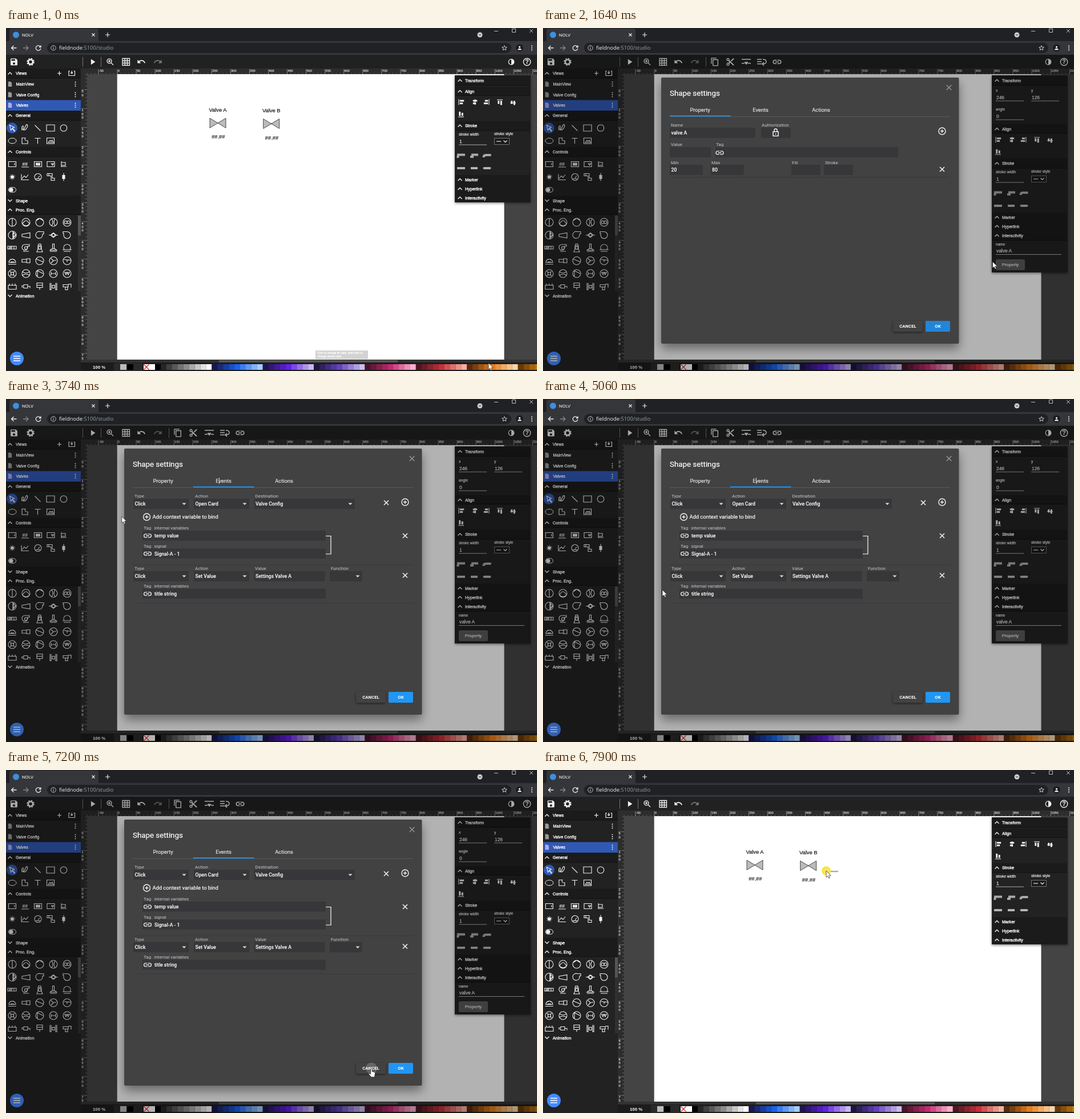
Write an HTML page that moves like this. It is 930x602 px and loops after 8000 ms.

```html
<!DOCTYPE html>
<html lang="en">
<head>
<meta charset="utf-8">
<title>Editor</title>
<style>
html,body{margin:0;width:100%;height:100%;overflow:hidden;background:#444}
svg{display:block;width:100vw;height:100vh;font-family:"Liberation Sans",Arial,sans-serif}
text{white-space:pre}
.dlg{font-family:Roboto,sans-serif}
</style>
</head>
<body>
<svg id="stage" viewBox="0 0 930 602"></svg>
<script>
const WHITE = '#f2f2f2', FIELD = '#37373a';
const rect = (x, y, w, h, fill, more = '') => `<rect x="${x}" y="${y}" width="${w}" height="${h}" fill="${fill}" ${more}/>`;
const text = (x, y, s, size = 7.3, fill = WHITE, more = '', bold = .2) =>
  `<text x="${x}" y="${y}" font-size="${size}" fill="${fill}" stroke="${fill}" stroke-width="${bold}" ${more}>${s}</text>`;
const line = (d, color = WHITE, w = 1, fill = 'none', more = '') => `<path d="${d}" stroke="${color}" stroke-width="${w}" fill="${fill}" ${more}/>`;
const disc = (x, y, r, fill, more = '') => `<circle cx="${x}" cy="${y}" r="${r}" fill="${fill}" ${more}/>`;
const ring = (x, y, r, w = 1, color = WHITE, more = '') => disc(x, y, r, 'none', `stroke="${color}" stroke-width="${w}" ${more}`);
const at = (x, y, s, scale = 1) => `<g transform="translate(${x} ${y}) scale(${scale})">${s}</g>`;
const group = (id, s, more = '') => `<g id="${id}" ${more}>${s}</g>`;
const icon = (x, y, d, size = 16, fill = WHITE) =>
  at(x - size / 2, y - size / 2, `<path d="${d}" fill="${fill}" fill-rule="evenodd"/>`, size / 24);
const cross = (x, y, r = 4, w = 1.6, color = WHITE) => line(`M${x - r} ${y - r}l${2 * r} ${2 * r}m0 ${-2 * r}l${-2 * r} ${2 * r}`, color, w);
const chevron = (x, y, up = true) => line(up ? `M${x - 3.5} ${y + 2}l3.5-3.5l3.5 3.5` : `M${x - 3.5} ${y - 2}l3.5 3.5l3.5-3.5`, WHITE, 1.3);
const repeat = (n, f) => Array.from({length: n}, (_, i) => f(i)).join('');
const MIDDLE = 'text-anchor="middle"';

const ICON = {
  save: 'M17 3H5a2 2 0 0 0-2 2v14a2 2 0 0 0 2 2h14a2 2 0 0 0 2-2V7zM12 19a3 3 0 1 1 0-6a3 3 0 0 1 0 6zM15 9H5V5h10z',
  play: 'M7 4v16l12-8z',
  undo: 'M12.5 8C9.9 8 7.5 9 5.6 10.6L2 7v9h9l-3.6-3.6C8.8 11.2 10.5 10.5 12.5 10.5c3.5 0 6.5 2.3 7.6 5.5l2.4-.8C21 11 17.1 8 12.5 8z',
  copy: 'M16 1H4a2 2 0 0 0-2 2v14h2V3h12zM19 5H8a2 2 0 0 0-2 2v14a2 2 0 0 0 2 2h11a2 2 0 0 0 2-2V7a2 2 0 0 0-2-2zM19 21H8V7h11z',
  cut: 'M9.6 7.6A4 4 0 1 0 7.6 9.6L10 12l-2.4 2.4A4 4 0 1 0 9.6 16.4L12 14l7 7h3v-1zM6 8a2 2 0 1 1 0-4a2 2 0 0 1 0 4zM6 20a2 2 0 1 1 0-4a2 2 0 0 1 0 4zM19 3l-6 6l2 2l7-7V3z',
  link: 'M3.9 12a3.1 3.1 0 0 1 3.1-3.1h4V7H7a5 5 0 0 0 0 10h4v-1.9H7A3.1 3.1 0 0 1 3.9 12zM8 13h8v-2H8zM17 7h-4v1.9h4a3.1 3.1 0 0 1 0 6.2h-4V17h4a5 5 0 0 0 0-10z',
  person: 'M12 12a4.5 4.5 0 1 0 0-9a4.5 4.5 0 0 0 0 9zM3 21c0-9 18-9 18 0z',
  file: 'M5 2h9l5 5v15H5z'
};

function browser() {
  const arrow = 'M5 0h-9m4-4l-4 4l4 4';
  return rect(0, 0, 930, 24, '#202124') + rect(0, 23, 930, 24, '#35363a')
    + line('M3 24q3 0 3-4V5q0-4 4-4h148q4 0 4 4v15q0 4 3 4z', 'none', 0, '#35363a')
    + disc(17.5, 12, 5.5, '#3d8fe0') + text(28, 15, 'NOLV', 7.6, '#e0e0e0')
    + cross(153, 12, 2.5, 1.1) + line('M174 12h8m-4-4v8', WHITE, 1.1)
    + disc(830, 12, 4.5, '#ccc') + line('M828 11l2 2l2-2', '#222')
    + line('M855 5.5h7', '#bbb') + line('M886.5 1.5h6v6h-6z', '#bbb') + cross(920, 5, 3, 1, '#bbb')
    + at(13.5, 35, line(arrow, WHITE, 1.3)) + at(35, 35, line(arrow, '#85868a', 1.3, 'none', 'transform="scale(-1 1)"'))
    + line('M60 32.5a4.3 4.3 0 1 0 .8 3.5M61 30.5v3h-3', WHITE, 1.3)
    + rect(72, 26, 813, 18, '#202124', 'rx="9"') + ring(83, 35, 4.3, .9, '#ccc') + line('M83 34v3.5M83 32v1', '#ccc')
    + `<text x="93" y="38.3" font-size="9.3" font-family="Open Sans,sans-serif" fill="#f0f0f0">fieldnode<tspan fill="#9aa0a6">:5100/studio</tspan></text>`
    + line('M873 30.8l1.2 2.9l3.1.2l-2.4 2l.8 3l-2.7-1.7l-2.7 1.7l.8-3l-2.4-2l3.1-.2z', '#ddd', .9)
    + disc(899.5, 35, 6.5, '#1b1c1f') + icon(899.5, 35, ICON.person, 9) + repeat(3, i => disc(921, 31.5 + 3.5 * i, 1.1, WHITE));
}

function toolbar() {
  const sep = x => line(`M${x} 51v17`, '#777', 1);
  return rect(0, 47, 930, 24, '#212121') + icon(14, 59.5, ICON.save)
    + ring(43, 59.5, 4, 2.6) + ring(43, 59.5, 5.8, 1.8, WHITE, 'stroke-dasharray="2.6 1.955"')
    + sep(134.5) + icon(152, 59.5, ICON.play, 15) + sep(166.5)
    + ring(181, 58, 3.9, 1.4) + line('M184 61l4 4M179 58h4m-2-2v4', WHITE, 1.4)
    + line('M204 53.5h12.5v12H204zm4.2 0v12m4.2-12v12M204 57.5h12.5M204 61.5h12.5', WHITE, 1.3)
    + icon(237, 59, ICON.undo) + at(266, 59, `<g transform="scale(-1 1)">${icon(0, 0, ICON.undo, 16, '#777')}</g>`)
    + group('selTools', sep(285.5) + icon(301, 59.5, ICON.copy) + icon(328, 59.5, ICON.cut)
      + at(356, 59, line('M-8-4h16M-8 3h5m6 0h5', WHITE, 1.6) + line('M-3 1l3 4l3-4z', WHITE, 1, WHITE))
      + at(383, 59, line('M-8-4h8M-8 0h8M-8 4h8M2-4q6 0 6 4q0 4-6 4M4 1l-3 3l3 3', WHITE, 1.5)) + icon(410, 59.5, ICON.link, 18))
    + ring(885, 59.5, 4.8, 1.2) + line('M885 54.5a5 5 0 0 1 0 10z', WHITE, 0, WHITE)
    + ring(912.5, 59.5, 6.2, 1.4) + text(912.5, 63, '?', 10, WHITE, MIDDLE + ' font-weight="bold"');
}

function rulers() {
  const step = 33.06;
  return rect(131, 71, 799, 531, '#444') + rect(131, 71, 799, 10, '#2d2d2d') + rect(131, 71, 11, 516, '#2d2d2d')
    + repeat(119, i => line(`M${142.1 + i * step / 5} 79v2`, '#888', .6))
    + repeat(24, i => line(`M${161.9 + i * step} 72v9`, '#aaa', .7) + text(162.8 + i * step, 77, (i - 1) * 50, 5.6, '#ddd'))
    + repeat(76, i => line(`M139 ${82 + i * step / 5}h3`, '#888', .6))
    + repeat(15, i => [...String((i + 1) * 50)].map((c, k) => text(132.5, 113.2 + i * step + k * 6.3, c, 5.6, '#ddd')).join('')
      + line(`M132 ${108.3 + i * step}h10`, '#888', .6))
    + rect(194.7, 81, 677.8, 501, '#fff');
}

function leftPanel() {
  const head = (y, name, open = true) => rect(0, y - 8.5, 131, 17, '#1b1b1b') + line(`M0 ${y + 8.5}h131`, '#111') + chevron(7, y, open)
    + text(17, y + 2.5, name, 7.3, '#fff', '', .35);
  const view = (y, name, on) => (on ? rect(0, y - 9, 131, 18.5, '#3059b5') : '') + icon(7, y, ICON.file, 11, on ? '#b9a6e8' : '#999')
    + text(17.5, y + 2.7, name, 7.3, '#fff', '', .3) + repeat(3, i => disc(121.5, y - 3.6 + 3.6 * i, 1, WHITE));
  const glyph = (x, y, d, fill) => at(x, y, line(d, WHITE, 1.1, fill));
  const C = 'M-7 0a7 7 0 1 0 14 0a7 7 0 1 0-14 0';
  const dot = 'M-2.5 0a2.5 2.5 0 1 0 5 0a2.5 2.5 0 1 0-5 0';
  const shapes = [
    C + 'M0-7v14', C + 'M-6 3q6-12 12 0M-5 4q5 4 10 0', C + 'M-6-3L0-7L6-3', C + 'M-3-6q4 6 0 12M3-6q-4 6 0 12', C + 'M-5 0a2.5 2.5 0 1 0 5 0a2.5 2.5 0 1 0-5 0m5 0a2.5 2.5 0 1 0 5 0a2.5 2.5 0 1 0-5 0',
    C + 'M1-6v12l5-6zM2-4v8l3-4', 'M-7-1.5L7-4v9L-7 2.5z', 'M7-6H1a6 6 0 1 0 4 6V-2h2z', 'M-8 0h3l5-4l5 4h3M-5 0l5 4l5-4' + dot, 'M-7-6h7a6 6 0 1 1-6 6V-3h-1z',
    'M-8-3H7v5H-8zM-6 2l2-5m0 5l2-5m0 5l2-5M3-3v5', 'M6-6H-2a5 5 0 1 0 5 5V-3h3zM-5 6H5' + dot, 'M-2-7h4v3h-4zM-3-4h6v6h-6zM-5 7l2-5h6l2 5z' + dot, 'M-1.5-7h3v8h-3zM-6 4q6-6 12 0zM-6 6H6', 'M-5 3a6 6 0 1 1 10 0zM-8 3h16M-6 6H6',
    'M-6 3a6 6 0 1 1 12 0zM-7 6H7M-4-2h3m2 0h3M-3 2h6', 'M-7-2.5h8v5h-8zM1-3.500h6v7h-6z', C + 'M-6-3L6 2', C + 'M-4-4L0 0l5-1M0 0l-4 4', C + 'M-5-2L6-1M0-1v3',
    C + dot + 'M-4-4l2 2m4 4l2 2m0-8l-2 2m-4 4l-2 2', C + 'M-6-3q6 4 12 0M-6 3q6-4 12 0', C + 'M-4-6v12M-4-5L6 0', C + 'M-4-3v6m8-6v6M-4 0h8', C + 'M-4-2l2 4l2-4l2 4l2-4M-5-2H5',
    'M-7-2H7v7H-7zM-5-2v-3m5 3v-3m5 3v-3', 'M-8-1h4v-2h7v6h-7v-2h-4M3 0h4v3', 'M-5-6H5V2H-5zM-5-2H5M0 2v4', 'M-6-6v12h2V-6M6-6v12h-2V-6M-2-2h4v5h-4z', 'M-7-3h9v4h-9zM2-4h5v6M-3 1v5h4v-5'
  ];
  return rect(0, 71, 131, 531, '#222') + head(79.5, 'Views') + line('M90 79.5h7m-3.5-3.5v7', WHITE, 1.2)
    + line('M112 75.5h-2v8h10.5v-8h-2M115.2 75v5m-2-2l2 2l2-2', WHITE, 1.2)
    + view(98.5, 'MainView') + view(117, 'Valve Config') + view(135.5, 'Valves', true) + head(153.5, 'General')
    + disc(10.5, 175.5, 9.5, '#3059b5')
    + glyph(10.5, 175.5, 'M-4-5L4-1L1 0l4 5l-1 1l-4-5l-2 3z') + glyph(33, 175.5, 'M-5 4c-2-9 4-10 2-4s2 3 4-3s5-2 3 2s-5 6-8 3')
    + glyph(55.5, 175.5, 'M-5-5L5 5') + glyph(78, 175.5, 'M-7-5.5H7v11H-7z') + ring(101, 175.5, 5.8, 1.1)
    + `<ellipse cx="11" cy="198" rx="7" ry="4.8" fill="none" stroke="${WHITE}"/>` + glyph(33, 198, 'M-5-5h6q-3 5 4 5v5h-10z')
    + glyph(55.5, 198, 'M-5-4.5H5M0-4.5V5') + glyph(78, 198, 'M-6.5-5h13v10h-13zM-4 3l3-4l2 2l2-2l2 4z')
    + head(217, 'Controls') + glyph(11, 239, 'M-6.5-4.5h13v9h-13zM4-2v4') + text(28.5, 241.5, '##', 8.5) + line('M27 244h13')
    + glyph(56, 239, 'M-6.5-4.5h13v9h-13z') + rect(52, 236.5, 8, 5, '#ddd') + glyph(78.5, 239, 'M-6.5-4.5h13v9h-13zM1-1h4l-2 3z')
    + glyph(101, 239, 'M-4-5v10M-4-3h7v5h-7M-4 4h9') + disc(11, 261.5, 3, WHITE) + ring(11, 261.5, 4.3, 1.3, WHITE, 'stroke-dasharray="1 2.378"')
    + glyph(33, 261.5, 'M-6-5V5H7M-5 3l4-5l3 3l4-5') + glyph(56, 261.5, 'M-6 0a6 6 0 1 0 12 0a6 6 0 1 0-12 0M0 2l3-4M-4 3h8')
    + glyph(78, 261.5, 'M-6-6h9v8h4v4H1V-2h-7zM-3-6v4') + glyph(101, 261.5, 'M0-7v14M-2-3h4v6h-4z', WHITE)
    + rect(4.5, 279.8, 13, 8.4, 'none', `rx="4.2" stroke="${WHITE}"`) + disc(9, 284, 3.6, WHITE)
    + head(303, 'Shape', false) + head(319, 'Proc. Eng.')
    + shapes.map((d, i) => glyph(11 + i % 5 * 24, 341 + (i / 5 | 0) * 22.5, d)).join('')
    + rect(126, 329, 5, 133, '#303030') + rect(126, 329, 5, 35, '#555') + rect(0, 462, 131, 140, '#222')
    + chevron(7, 470, false) + text(17, 472.5, 'Animation', 7.3, '#fff', '', .35)
    + disc(19, 580, 12, '#448aff') + line('M13 576h12m-12 4h12m-12 4h12', '#fff', 1.4);
}

// Each palette family runs from dark through a pure tone to a pale tint.
function palette() {
  const families = [['#262626', '#8c8c8c', '#ffffff'], ['#191650', '#1862ef', '#a5cdfb'], ['#201452', '#6420e8', '#c8b8f2'], ['#1c163f', '#6442bd', '#cbbcf0'],
    ['#4b1328', '#c22a72', '#f9aeca'], ['#4e1520', '#c83039', '#f5b09f'], ['#5a2a0e', '#e57f1a', '#fad6aa'], ['#6a3808', '#e09010', '#f8dc90']];
  const channel = (c, k) => parseInt(c.slice(1 + 2 * k, 3 + 2 * k), 16);
  const shade = (f, u) => {
    const i = u < .5 ? 0 : 1, v = u * 2 - i;
    return `rgb(${[0, 1, 2].map(k => Math.round(channel(f[i], k) * (1 - v) + channel(f[i + 1], k) * v))})`;
  };
  const w = 9.93;
  return rect(131, 587, 799, 15, '#1c1c1c') + rect(131, 582, 799, 5, '#333') + rect(373, 583, 313, 4, '#555') + text(152, 598, '100 %', 7.8, '#fff', 'font-weight="bold"', 0)
    + rect(189, 588, 50, 14, '#2a2a2a') + rect(200, 590, 11, 10, '#bbb') + rect(212, 590, 11, 10, '#000')
    + rect(241, 590, 20, 10, '#fff') + cross(246, 595, 4.5, 1.2, '#d22') + rect(261, 590, 10, 10, '#000')
    + families.map((f, n) => repeat(9, i => rect((271 + (n * 9 + i) * w).toFixed(1), 590, 10, 10, shade(f, i / 8)))).join('');
}

function valve(cx, y, name) {
  return text(cx, y - 11.5, name, 9.3, '#111', MIDDLE) + line(`M${cx - 14} ${y}l28 17v-17l-28 17z`, '#222', .8, '#bbb')
    + text(cx + .8, y + 36, '##.##', 9.3, '#111', MIDDLE);
}

function selection() {
  return line('M371 148v9', '#2ecc40', 1) + line('M357 158h28v17h-28z', '#7fa7ea', .8) + disc(371, 145, 3, '#22c837')
    + repeat(9, i => i === 4 ? '' : rect(355 + i % 3 * 14, 156 + (i / 3 | 0) * 8.5, 4, 4, '#e4edff', 'stroke="#6a98ee" stroke-width=".8"'));
}

function sidePanel() {
  const head = (y, s) => rect(787, y - 8, 131, 16, '#1b1b1b') + chevron(795, y) + text(804, y + 2.5, s, 7.3, '#fff', '', .35);
  const rule = y => line(`M787 ${y}h131`, '#0f0f0f');
  const input = (x, y, label, value, w = 49) => text(x, y, label, 6.6, '#eee') + text(x + 1, y + 12.8, value, 8.4) + line(`M${x} ${y + 16}h${w}`, '#bbb', .9);
  const bars = 'M-2-3.5h7v2.5h-7zM-2 1h5v2.5h-5z';
  const align = (x, y, axis, turn) => at(x, y, `<g transform="rotate(${turn})">${line(axis, WHITE, 1.1) + line(bars, WHITE, .4, WHITE)}</g>`);
  const grey = (x, y, d, more) => at(x, y, line(d, '#aaa', 4, 'none', more));
  return rect(786, 83, 133, 223, '#212121', 'id="panelBg" filter="url(#shadow)"') + head(92, 'Transform') + rule(100.5)
    + group('fields', input(793, 112, 'x', 246) + input(855, 112, 'y', 126) + input(793, 145, 'angle', 0))
    + group('lower', head(111, 'Align') + rule(118.5)
      + align(797, 130, 'M-4-5v10', 0) + align(820, 130, 'M1.5-5v10', 0) + align(842, 130, 'M-4-5v10', 180) + align(865, 130, 'M-4-5v10', 90)
      + align(888, 130, 'M1.5-5v10', 90) + align(797, 152, 'M-4-5v10', -90)
      + head(171.5, 'Stroke') + rule(180) + input(793, 189, 'stroke width', 1) + text(855, 188, 'stroke style', 6.6, '#eee')
      + rect(855.5, 193.5, 26, 11, '#1b1b1b', 'stroke="#888" stroke-width=".8"') + line('M859 199h8', WHITE, 1.1) + line('M871.5 197.5l3 3l3-3', WHITE, 1.2)
      + grey(797, 224, 'M-7-1.5H7M-5.5 0v4') + grey(820, 224, 'M-7 2h4v-3.5H7') + grey(842.5, 224, 'M-6 3q0-4 4-4H7')
      + grey(797, 246, 'M-7 0H7') + grey(820, 246, 'M-6 0H6') + grey(842.5, 246, 'M-5 0H5', 'stroke-linecap="round"')
      + line('M791 246h12m11 0h12m11 0h11', '#ddd', .6)
      + head(266, 'Marker') + head(282, 'Hyperlink') + head(298, 'Interactivity'))
    + group('naming', rule(372.5) + input(793, 381.5, 'name', 'valve A', 115) + rect(793, 406, 51, 19, '#5a5a5a', 'id="propBtn" rx="2"')
      + text(818.5, 418.3, 'Property', 7.8, WHITE, MIDDLE));
}

function dialog() {
  const label = (x, y, s) => text(x, y, s, 8, '#c8c8c8', '', 0);
  const value = (x, y, s) => text(x, y, s, 8.6, '#fff', 'font-weight="500"', .1);
  const box = (x, y, w, s = '') => rect(x, y, w, 18, FIELD) + value(x + 2.5, y + 11.6, s);
  const drop = (x, y, w, name, s) => label(x + 2, y - 2, name) + box(x, y, w, s) + line(`M${x + w - 11.5} ${y + 7.5}h7l-3.5 3.5z`, 'none', 0, '#ddd');
  const plus = (x, y) => ring(x, y, 6, 1.4) + line(`M${x - 3} ${y}h6m-3-3v6`, WHITE, 1.4);
  const tag = (y, kind, s) => label(241, y - 2, 'Tag') + label(259.5, y - 2, kind) + rect(239, y, 321, 17.5, FIELD) + icon(248, y + 9, ICON.link, 17) + value(260, y + 12, s);
  const divider = y => line(`M222 ${y}h491`, '#393939');
  const tab = (x, s) => text(x, 147, s, 9.3, '#e4e4e4', MIDDLE);
  const caption = (x, s) => text(x, 526.3, s, 7.8, '#fff', MIDDLE + ' font-weight="700"', 0);

  const property = label(224, 173, 'Name') + box(222, 175, 150, 'valve A') + label(383, 173, 'Authorization') + box(382, 175, 52)
    + rect(403, 182, 9, 7.5, 'none', 'stroke="#fff" stroke-width="1.4"') + line('M405 182v-2.5a2.5 2.5 0 0 1 5 0v2.5M407.5 185v2', '#fff', 1.3) + plus(699, 181)
    + label(224, 207, 'Value') + box(222, 209, 72) + label(303, 207, 'Tag') + box(302, 209, 320) + icon(309.5, 219, ICON.link, 17)
    + label(224, 238.5, 'Min') + box(222, 240, 58, 20) + label(295, 238.5, 'Max') + box(293.5, 240, 58, 80)
    + label(436, 238.5, 'Fill') + box(435, 240, 51) + label(494, 238.5, 'Stroke') + box(492, 240, 51) + cross(699, 248) + divider(262);

  const events = drop(223, 175, 97, 'Type', 'Click') + drop(329, 175, 97, 'Action', 'Open Card') + drop(434.5, 175, 176.5, 'Destination', 'Valve Config')
    + cross(666, 182) + plus(699, 181) + plus(246.5, 207) + text(256.5, 210, 'Add context variable to bind', 9.3, '#fff')
    + tag(231, 'internal variables', 'temp value') + tag(262.5, 'signal', 'Signal-A - 1') + line('M560 240.5h9v31.5h-9', '#fff', 1.2) + cross(699, 240) + divider(291)
    + drop(223, 302, 97, 'Type', 'Click') + drop(329, 302, 97, 'Action', 'Set Value') + label(436, 300, 'Value') + box(434.5, 302, 124, 'Settings Valve A')
    + drop(567, 302, 57, 'Function', '') + cross(699, 309.5) + tag(333, 'internal variables', 'title string') + divider(358);

  return rect(207, 87, 521.5, 467, '#424242', 'rx="2" filter="url(#lift)"') + text(222, 118.5, 'Shape settings', 13.3, '#fff') + cross(711, 104.5, 4.3, 1.2, '#aaa')
    + rect(328, 132, 106, 23, '#555', 'id="hover"') + tab(275, 'Property') + tab(381, 'Events') + tab(487, 'Actions')
    + line('M222 155.5h491', '#5a5a5a') + rect(222, 153.5, 106.5, 1.7, '#2196f3', 'id="ink"')
    + `<g clip-path="url(#pages)">${group('property', property)}${group('events', events)}</g>` + line('M373.5 138v11', '#ddd', .9, 'none', 'id="caret"')
    + rect(613, 514, 52, 19, '#424242', 'rx="2" filter="url(#shadow)"') + disc(640, 523.5, 10, '#666', 'id="ripple"') + rect(670, 514, 43, 19, '#2196f3', 'id="ok" rx="2"')
    + caption(639, 'CANCEL') + caption(691.5, 'OK');
}

const tooltip = rect(542, 566, 92, 15, '#bdbdbd', 'rx="1"') + text(545, 572, 'Click to change fill color, shift-click to', 4.9, '#fff') + text(545, 578, 'change stroke color', 4.9, '#fff');
const arrowCursor = line('M0 0v11.5l2.7-2.5l1.7 4l2-.8l-1.7-4h3.6z', '#222', .7, '#fff');
const handCursor = line('M-1.3 1.2q1.3-2.4 2.6 0v4l4.2 1q1.3.5 1 2.2l-1 6.6h-6l-4.3-5.5q0-2 2-.8l1.5 1.2z', '#222', .8, '#fff');
const shadow = (id, dy, blur, opacity) => `<filter id="${id}" x="-20%" y="-20%" width="140%" height="140%"><feDropShadow dx="0" dy="${dy}" stdDeviation="${blur}" flood-opacity="${opacity}"/></filter>`;

const stage = document.getElementById('stage');
stage.innerHTML = `<defs>${shadow('shadow', 1.5, 2, .5)}${shadow('lift', 9, 9, .42)}
  <clipPath id="pages"><rect x="222" y="156" width="491" height="350"/></clipPath></defs>`
  + rulers() + valve(371, 158.3, 'Valve A') + valve(464.7, 159.5, 'Valve B')
  + group('selection', selection()) + leftPanel() + toolbar() + palette() + sidePanel() + browser() + group('tip', tooltip)
  + rect(0, 47, 930, 555, '#000', 'id="shade"') + group('dialog', dialog(), 'class="dlg"')
  + rect(503, 176.8, 14, 2.4, '#aaa', 'id="trail"') + disc(0, 0, 8, '#f6e231', 'id="press" opacity=".85"')
  + group('arrow', arrowCursor) + group('hand', handCursor);

const el = id => document.getElementById(id);
const set = (id, name, v) => el(id).setAttribute(name, v);
const show = (id, on) => set(id, 'display', on ? 'inline' : 'none');
const clamp = v => Math.max(0, Math.min(1, v));

// Cubic Bezier easing (.35, 0, .25, 1), solved by bisection.
function ease(x) {
  if (x <= 0 || x >= 1) return clamp(x);
  let lo = 0, hi = 1, u;
  for (let i = 0; i < 20; i++) {
    u = (lo + hi) / 2;
    const v = 1 - u;
    if (3 * v * v * u * .35 + 3 * v * u * u * .25 + u ** 3 < x) lo = u; else hi = u;
  }
  return u * u * (3 - 2 * u);
}

// time, x, y of the pointer tip; equal neighbours are rests
const route = [[0, 845, 588], [90, 845, 588], [600, 371, 167], [830, 371, 167], [1120, 772, 421], [1250, 772, 421], [1320, 815, 422],
  [1639, 815, 422], [1640, 789, 411], [2120, 375, 145], [2900, 375, 145], [3190, 375, 128], [3370, 221, 145], [3510, 221, 145],
  [3850, 197, 240], [4220, 203, 304], [4750, 204, 313], [4950, 209, 335], [5060, 209, 335], [5500, 580, 398], [5690, 655, 372],
  [6000, 677, 340], [6280, 677, 340], [6800, 640, 524], [7400, 640, 524], [7800, 496, 177], [8000, 496, 177]];

// Monotone cubic through the route: passes waypoints smoothly, stops at rests and turns.
function along(t, k) {
  const slope = i => route[i] && route[i - 1] ? (route[i][k] - route[i - 1][k]) / (route[i][0] - route[i - 1][0]) : 0;
  const tangent = i => {
    const a = slope(i), b = slope(i + 1);
    return a * b > 0 ? 2 * a * b / (a + b) : 0;
  };
  const i = route.findIndex(p => p[0] > t), h = route[i][0] - route[i - 1][0];
  const u = (t - route[i - 1][0]) / h, v = 1 - u;
  return route[i - 1][k] * v * v * (1 + 2 * u) + route[i][k] * u * u * (3 - 2 * u) + h * u * v * (tangent(i - 1) * v - tangent(i) * u);
}

function draw(t) {
  const between = (a, b) => t >= a && t < b;
  const x = along(t, 1), y = along(t, 2), selected = between(700, 7800);
  for (const id of ['selection', 'selTools', 'fields', 'naming']) show(id, selected);
  set('lower', 'transform', `translate(0 ${selected ? 66 : 0})`);
  set('panelBg', 'height', selected ? 346 : 223);
  set('propBtn', 'fill', between(1290, 1640) ? '#666d70' : '#5a5a5a');
  set('tip', 'opacity', .65 * clamp(1 - (t - 60) / 200));
  set('shade', 'opacity', t < 1640 ? 0 : .3 * clamp((7500 - t) / 220));

  show('dialog', between(1640, 7280));
  set('ok', 'fill', t < 1740 ? '#2385d7' : '#2196f3');
  const slide = ease((t - 2170) / 500);
  set('ink', 'x', 222 + 106 * slide);
  set('property', 'transform', `translate(${-491 * slide} 0)`);
  set('events', 'transform', `translate(${491 * (1 - slide)} 0)`);
  show('hover', between(2100, 3150));
  show('caret', between(2460, 5800) && (t - 2460) % 1060 < 530);
  show('ripple', t >= 7200);

  const hand = between(1280, 1640) || between(2100, 3150) || between(6740, 7280);
  show('hand', hand);
  show('arrow', !hand);
  for (const id of ['hand', 'arrow', 'press']) set(id, 'transform', `translate(${x} ${y})`);
  show('press', between(660, 830) || t >= 7800);
  show('trail', t >= 7840);
}

const start = performance.now();
(function frame() {
  draw((performance.now() - start) % 8000);
  requestAnimationFrame(frame);
})();
</script>
</body>
</html>
```
